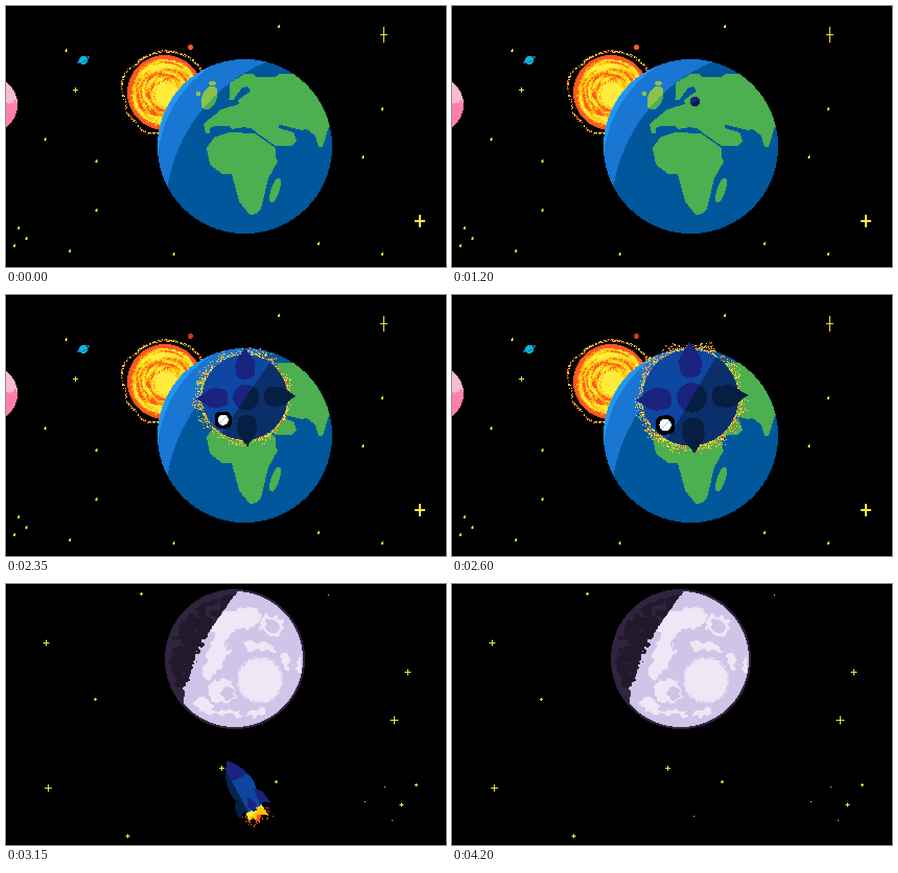
Animation of 842x500 px, one loop 5.2 s. Source, as an HTML page with a canvas:

```html
<!DOCTYPE html>
<html lang="en">
<head>
<meta charset="utf-8">
<title>Rocket to the moon</title>
<style>
html, body { margin: 0; height: 100%; overflow: hidden; background: #000; }
canvas { display: block; width: 842px; height: 500px; }
</style>
</head>
<body>
<canvas id="stage" width="842" height="500"></canvas>
<script>
const start = performance.now();
const LOOP = 5200, CELL = 2;
const YELLOW = '#ffeb3b', AMBER = '#ffc107', ORANGE = '#ff5722';
const NAVY = '#1a237e', BLUE = '#0d47a1', DEEP = '#051e42';
const stage = document.getElementById('stage').getContext('2d');
const probe = document.createElement('canvas').getContext('2d');

const path = d => new Path2D(d);
const within = (p, x, y) => probe.isPointInPath(p, x, y);
const dist = (x, y, cx, cy) => Math.hypot(x - cx, y - cy);
const mix = (a, b, k) => a + (b - a) * k;
const even = v => Math.floor(v / CELL) * CELL;

function turned(x, y, angle) {
  const c = Math.cos(angle), s = Math.sin(angle);
  return [x * c + y * s, y * c - x * s];
}

// Below 1 inside the turned ellipse
function oval(x, y, [cx, cy, rx, ry, angle = 0]) {
  const [u, v] = turned(x - cx, y - cy, angle);
  return Math.hypot(u / rx, v / ry);
}

function hash(x, y, seed = 0) {
  let n = Math.imul(x, 374761393) + Math.imul(y, 668265263) + Math.imul(seed, 1274126177);
  n = Math.imul(n ^ (n >>> 13), 1103515245);
  return ((n ^ (n >>> 16)) >>> 0) / 4294967296;
}

// Smooth value noise in 0..1
function noise(x, y, seed = 0) {
  const i = Math.floor(x), j = Math.floor(y), u = x - i, v = y - j;
  return mix(mix(hash(i, j, seed), hash(i + 1, j, seed), u),
             mix(hash(i, j + 1, seed), hash(i + 1, j + 1, seed), u), v);
}

// Colours every cell around a centre with colour(x, y); a falsy colour leaves it alone
function paint(g, cx, cy, r, colour) {
  for (let y = even(Math.max(0, cy - r)); y < Math.min(500, cy + r); y += CELL)
    for (let x = even(Math.max(0, cx - r)); x < Math.min(842, cx + r); x += CELL) {
      const c = colour(x + 1, y + 1);
      if (c) { g.fillStyle = c; g.fillRect(x, y, CELL, CELL); }
    }
}

function disc(g, cx, cy, r, colour) {
  paint(g, cx, cy, r + 2, (x, y) => dist(x, y, cx, cy) < r && colour(x, y));
}

function cross(g, x, y, armX, armY, width = 2) {
  g.fillStyle = YELLOW;
  g.fillRect(x - armX, y, 2 * armX + width, width);
  g.fillRect(x, y - armY, width, 2 * armY + width);
}

// Two small overlapping squares
function fleck(g, x, y) {
  g.fillStyle = YELLOW;
  g.fillRect(x - 2, even(y), 4, 4);
  g.fillRect(x, even(y) - 2, 2, 4);
}

function scene(draw) {
  const canvas = document.createElement('canvas');
  canvas.width = 842;
  canvas.height = 500;
  const g = canvas.getContext('2d');
  g.fillRect(0, 0, 842, 500);
  draw(g);
  return canvas;
}

// ---- Earth and sun ----
const EURASIA = path('M428,148L456,130H472L478,136H515L522,131 640,130V230H618L606,270H598L592,248 575,236 566,238 522,227V234L550,242 556,258 548,268 516,268 484,246 470,235 456,232 432,236 428,230H400L390,234V244H382L378,226 412,198 446,188 444,180 468,163 462,154 452,156 436,179H427Z');
const AFRICA = path('M398,252L428,242 476,244 516,272V290L520,298 502,330 488,388 480,398 466,400 446,374 432,322H414L390,304 384,272Z');
const ISLANDS = [[515, 353, 8, 25, .3], [389, 176, 14, 24, .4], [368, 168, 5, 4], [395, 148, 8, 4]];

function sunColour(x, y) {
  const r = dist(x, y, 304, 166), a = Math.atan2(y - 166, 304 - x) + 9;
  if (r < 72) {
    const v = .75 * noise(a * 2.2, r / 3.2, 3) + .25 * hash(x, y, 4);
    if (r > 61 + 8 * v) return ORANGE;
    if (dist(x, y, 308, 169) < 14 + 16 * v) return YELLOW;
    return v > .64 ? ORANGE : v > .43 ? AMBER : YELLOW;
  }
  const ring = 75 + 10 * noise(a * 4, 1, 5);
  if (Math.abs(r - ring) < 2.2 && hash(x, y, 7) > .45)
    return hash(x, y, 8) > .4 ? YELLOW : ORANGE;
}

function earthColour(x, y) {
  const lit = dist(x, y, 619, 397) > 314;
  if (within(EURASIA, x, y) || within(AFRICA, x, y) || ISLANDS.some(o => oval(x, y, o) < 1))
    return lit ? '#8bc34a' : '#4caf50';
  return dist(x, y, 515, 305) > 225 && x < 400 && y < 280 ? '#2196f3' : lit ? '#1976d2' : '#01579b';
}

const earthScene = scene(g => {
  for (const [x, y] of [[522, 39], [115, 84], [720, 196], [75, 254], [173, 297], [683, 288],
    [173, 391], [24, 425], [39, 444], [16, 458], [122, 468], [321, 475], [598, 455], [720, 474]])
    fleck(g, x, y);
  cross(g, 722, 54, 6, 14);
  cross(g, 132, 160, 4, 4);
  cross(g, 790, 410, 8, 10, 4);
  disc(g, -31, 189, 53, (x, y) => y + 26 * (noise(x / 6, y / 4) - .5) > 188 ? '#ff80ab' : '#f8bbd0');
  disc(g, 148, 104, 8, () => '#00bcd4');
  paint(g, 148, 103, 14, (x, y) => {
    const ring = oval(x, y, [148, 103, 13, 4, -.45]);
    return ring > .72 && ring < 1.1 && (y > 103 || dist(x, y, 148, 104) > 8) && '#3f51b5';
  });
  paint(g, 304, 166, 90, sunColour);
  disc(g, 457, 269, 167, earthColour);
});

// ---- Moon ----
const BRIGHT = [[440, 72, 54, 22, -.3], [406, 128, 18, 56, .4], [412, 206, 28, 22], [380, 234, 22, 10, .5],
  [425, 247, 26, 6], [479, 246, 18, 8, -.4], [486, 120, 30, 10, .2], [536, 148, 7, 18, -.2], [560, 156, 5, 14]];
const HOLLOWS = [[424, 208, 12, 10], [456, 42, 14, 5], [508, 76, 12, 8], [440, 100, 26, 5, -.7]];

function moonColour(x, y) {
  const r = dist(x, y, 438, 144);
  const ragged = mix(3, 18, +(Math.abs(y - 152) < 52)) * (noise(x / 5, y / 4, 11) - .5);
  const terminator = 340 + 106 * (Math.max(0, 232 - y) / 220) ** 1.7;
  if (x + ragged < terminator) {
    const inner = r < 128 - 12 * noise(x / 8, y / 8, 13) && y < 198;
    return inner && noise(x / 11, y / 9, 14) > .3 ? '#211a2d' : '#30243f';
  }
  if (r > 130) return '#30243f';
  const crater = dist(x, y, 486, 184);
  if (crater < 41 || crater < 45 && hash(x, y, 15) > .5) return '#ede7f6';
  const wx = x + 14 * (noise(x / 9, y / 6, 16) - .5), wy = y + 14 * (noise(x / 7, y / 8, 17) - .5);
  const hit = o => oval(wx, wy, o) < 1;
  const arc = Math.abs(oval(wx, wy, [508, 80, 18, 16]) - 1) < .2;
  return crater > 50 && (arc || BRIGHT.some(hit)) && !HOLLOWS.some(hit) ? '#ede7f6' : '#d1c4e9';
}

const moonScene = scene(g => {
  for (const [x, y, arm] of [[258, 18, 2], [616, 20, 0], [76, 112, 5], [170, 220, 2], [768, 168, 5],
    [742, 260, 7], [80, 390, 6], [412, 352, 4], [516, 378, 2], [724, 388, 0], [784, 384, 2],
    [756, 422, 3], [686, 416, 0], [738, 452, 0], [462, 444, 0], [232, 482, 3]])
    cross(g, x, y, arm, arm);
  disc(g, 438, 144, 134, moonColour);
});

// ---- Rocket seen from the front: nose, then hull and four fins ----
const FIN = path('M0,-1C.06,-.86 .2,-.78 .2,-.62L.18,-.46Q.15,-.36 0,-.36Q-.15,-.36 -.18,-.46L-.2,-.62C-.2,-.78 -.06,-.86 0,-1Z');

function drawApproach(t) {
  const nose = 1.4 + 27 * ((t - 500) / 2100) ** 1.15;
  const grown = Math.sin(Math.max(0, t - 1380) / 1500 * Math.PI / 2);
  const reach = 113 * grown, hull = reach * .85;
  const cx = mix(465, 459, Math.sqrt(grown)), cy = mix(183, 197, Math.sqrt(grown));
  const turn = -.045 * Math.max(0, t - 2000) / 600;
  const light = 1.09 - .58 * grown, drift = .3 + .2 * grown;
  paint(stage, cx, cy, Math.max(nose, reach * 1.2) + 2, (x, y) => {
    const dx = x - cx, dy = y - cy, r = Math.hypot(dx, dy);
    const dark = turned(dx, dy, light)[0] > 0;
    if (r < nose) return dark ? DEEP : NAVY;
    if (!reach) return;
    let [u, v] = turned(dx / reach, dy / reach, turn);
    const wx = u + drift, wy = v - drift + .03;
    if (Math.hypot(wx, wy) < .105) return Math.abs(wx + wy) < .02 ? '#bbdefb' : '#fff';
    if (Math.cbrt(Math.abs(wx) ** 3 + Math.abs(wy) ** 3) < .168) return '#000';
    for (let i = 0; i < 4; i++) {
      if (within(FIN, u, v)) return dark ? DEEP : NAVY;
      [u, v] = [v, -u];
    }
    const edge = Math.hypot(dx + 3 * grown, dy) / hull - 1;
    if (edge < 0) return dark ? '#0b2f6b' : BLUE;
    const flare = .08 + .24 * noise(Math.atan2(dy, dx) * 5 + 30, t / 50, 21);
    if (hash(x, y, t) < .6 * (1 - edge / flare))
      return hash(x, y, t + 1) > .35 ? YELLOW : ORANGE;
  });
}

// ---- Rocket seen from behind, flying round the moon ----
const HULL = path('M0,-62C14,-46 20,-30 20,-14L13,22H-13L-20,-14C-20,-30 -14,-46 0,-62Z');
const SIDE_FIN = path('M14,-6L24,4 27,24 12,18Z');
const BACK_FIN = path('M0,2L7,13 3,25H-3L-7,13Z');
const FLAME = path('M-13,18L-16,36 -8,33 -2,46 5,34 15,41 13,18Z');

const bezier = (p, a, b, c, d) => mix(
  mix(mix(a, b, p), mix(b, c, p), p), mix(mix(b, c, p), mix(c, d, p), p), p);
const flight = p => [bezier(p, 470, 470, 202, 349), bezier(p, 428, 400, 23, 127)];

function drawFlight(t) {
  const p = (t - 3050) / 900;
  if (p >= 1) {
    stage.fillStyle = BLUE;
    stage.fillRect(346, 122, 6, 10);
    return;
  }
  const [cx, cy] = flight(p), [nx, ny] = flight(p + .02);
  const turn = Math.atan2(nx - cx, cy - ny), scale = 1.3 - 1.21 * p ** 1.6;
  paint(stage, cx, cy, 66 * scale + 2, (x, y) => {
    if (p < .67 && dist(x, y, 438, 144) < 134) return;
    const [u, v] = turned((x - cx) / scale, (y - cy) / scale, turn);
    if (within(BACK_FIN, u, v) || within(SIDE_FIN, u, v)) return NAVY;
    if (within(SIDE_FIN, -u, v)) return DEEP;
    if (within(HULL, u, v)) return u < -9 ? '#07264f' : v < -30 ? NAVY : BLUE;
    if (within(FLAME, u, v)) {
      const heat = v + 16 * noise(u / 5 + 20, v / 6, t);
      return heat < 37 ? YELLOW : heat < 44 ? AMBER : ORANGE;
    }
    if (v > 22 && v < 47 && Math.abs(u) < 21 && hash(x, y, t) > .9) return ORANGE;
  });
}

// The picture advances every 100 ms at first and every 50 ms later
function frameTime(t) {
  if (t < 2050) return Math.floor(t / 100) * 100;
  if (t < 2250) return Math.floor((t - 50) / 100) * 100 + 50;
  return Math.floor(t / 50) * 50;
}

let shown = -1;
function tick() {
  const t = frameTime((performance.now() - start) % LOOP);
  if (t !== shown) {
    shown = t;
    stage.drawImage(t < 2800 ? earthScene : moonScene, 0, 0);
    if (t < 2800) {
      disc(stage, 353, 79, 5.4, (x, y) =>
        t < 1500 ? ORANGE : hash(x, y, 31) > .7 ? '#b71c1c' : '#d84024');
      if (t >= 500) drawApproach(t);
    } else if (t >= 3050 && t < 4200) drawFlight(t);
  }
  requestAnimationFrame(tick);
}
tick();
</script>
</body>
</html>
```
